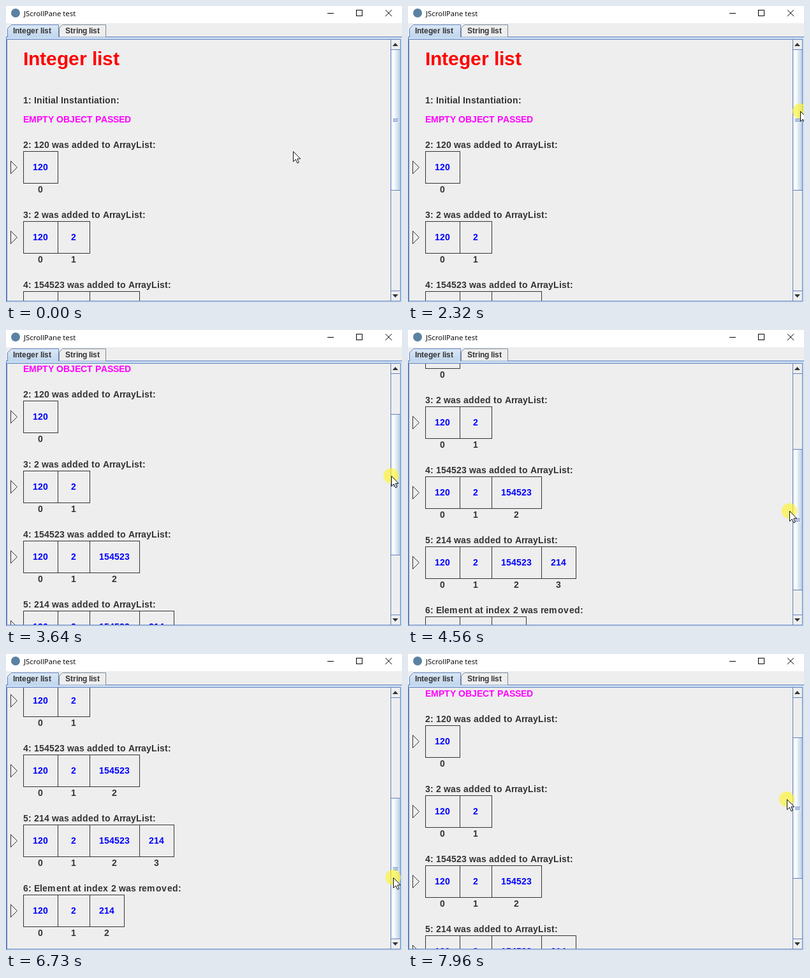
Write an HTML page that moves like this. It is 621 by 465 pixels and loops after 8000 ms.

```html
<!DOCTYPE html>
<html lang="en">
<head>
<meta charset="utf-8">
<title>JScrollPane test</title>
<style>
  html, body { margin: 0; width: 100%; height: 100%; overflow: hidden; background: #eee; }
  svg { display: block; width: 621px; height: 465px; }
  text { font-family: "Liberation Sans", Arial, sans-serif; font-weight: bold; fill: #333; font-kerning: none; }
  .caption { font: 11.4px "Open Sans", "Noto Sans", sans-serif; fill: #000; }
  .line { fill: none; stroke: #333; shape-rendering: crispEdges; }
  .blue { stroke: #6382bf; shape-rendering: crispEdges; }
</style>
</head>
<body>
<svg id="stage" viewBox="0 0 621 465">
  <defs>
    <clipPath id="view"><rect x="2" y="53" width="601" height="410"/></clipPath>
    <linearGradient id="thumbFill">
      <stop offset="0" stop-color="#dde8f3"/>
      <stop offset=".3" stop-color="#fff"/>
      <stop offset=".6" stop-color="#dde8f3"/>
      <stop offset="1" stop-color="#b8cfe5"/>
    </linearGradient>
    <linearGradient id="tabFill" x2="0" y2="1">
      <stop offset="0" stop-color="#dbe8f6"/>
      <stop offset="1" stop-color="#c0d6ec"/>
    </linearGradient>
  </defs>

  <!-- title bar -->
  <rect width="621" height="465" fill="#eee"/>
  <rect width="621" height="27" fill="#fff"/>
  <circle cx="15" cy="11" r="7" fill="#5b82a3"/>
  <text class="caption" x="28" y="16">JScrollPane test</text>
  <g fill="none" stroke="#000">
    <path d="M504 11.5h10M549.5 6.5h9v9h-9z" shape-rendering="crispEdges"/>
    <path d="M595 6.2l10 10M605 6.2l-10 10"/>
  </g>

  <!-- tabs and pane frame -->
  <rect y="48" width="621" height="417" fill="#c8ddf2"/>
  <path class="blue" d="M0 48.5H621M.5 48V465" fill="none"/>
  <path d="M83.5 48.5V34.5L88.5 29.5H156.5V48.5" fill="#eee" stroke="#7a8a99"/>
  <path d="M2.5 49V35.5L8.5 29.5H82.5V49" fill="url(#tabFill)" stroke="#6382bf"/>
  <rect class="blue" x="1.5" y="52.5" width="617" height="411" fill="#eee"/>
  <g id="tabs"></g>

  <g clip-path="url(#view)"><g id="list"></g></g>

  <!-- scroll bar -->
  <path class="blue" d="M603.5 53V463M603 68.5H619M603 447.5H619" fill="none"/>
  <path d="M606 63L610.5 58 615 63zM606 453L610.5 458 615 453z" fill="#333"/>
  <g id="thumb">
    <rect class="blue" x="603.5" y="68.5" width="15" height="221" fill="url(#thumbFill)"/>
    <path d="M608 178.500h8M608 180.500h8M608 182.500h8" stroke="#fff" shape-rendering="crispEdges"/>
    <path class="blue" d="M607 177.500h8M607 179.500h8M607 181.500h8"/>
  </g>

  <g id="pointer">
    <circle id="halo" r="12" fill="#fff52e" opacity=".65"/>
    <path d="M.5 .5V16.500L4.300 13 6.900 18.800 9.300 17.700 6.800 12H11.700z" fill="#fff" stroke="#111"/>
  </g>
</svg>
<script>
const $ = id => document.getElementById(id);
const pen = document.createElement('canvas').getContext('2d');
const wide = { m: 14, v: 9, x: 9 };

function add(parent, tag, attrs) {
  const el = document.createElementNS('http://www.w3.org/2000/svg', tag);
  for (const name in attrs) el.setAttribute(name, attrs[name]);
  return parent.appendChild(el);
}

// Swing style text: every glyph advances by whole pixels.
function label(parent, str, x, y, size = 14, fill = '#333') {
  pen.font = `bold ${size}px "Liberation Sans", Arial, sans-serif`;
  const xs = [];
  for (const ch of str) {
    xs.push(x);
    x += (size === 14 && wide[ch]) || Math.round(pen.measureText(ch).width);
  }
  const el = add(parent, 'text', { x: xs.join(' '), y, 'font-size': size });
  el.style.fill = fill;
  el.textContent = str;
}

function cells(values, top) {
  let x = 27;
  add(list, 'path', { d: `M7.5 ${top + 15.5}l10 10-10 10z`, fill: 'none', stroke: '#333' });
  values.forEach((value, i) => {
    const str = String(value), half = str.length * 4;
    const width = Math.max(50, half * 2 + 30), mid = x + width / 2;
    add(list, 'rect', { class: 'line', x: x + .5, y: top + .5, width, height: 50 });
    label(list, str, mid - half, top + 30, 14, '#00f');
    label(list, String(i), mid - 4, top + 65);
    x += width;
  });
}

label($('tabs'), 'Integer list', 11, 43, 12);
label($('tabs'), 'String list', 93, 43, 12);

const list = $('list');
label(list, 'Integer list', 27, 93, 30, '#f00');
label(list, '1: Initial Instantiation:', 27, 153);
label(list, 'EMPTY OBJECT PASSED', 27, 183, 14, '#f0f');
[
  ['120 was added to ArrayList:', [120]],
  ['2 was added to ArrayList:', [120, 2]],
  ['154523 was added to ArrayList:', [120, 2, 154523]],
  ['214 was added to ArrayList:', [120, 2, 154523, 214]],
  ['Element at index 2 was removed:', [120, 2, 214]]
].forEach(([note, values], i) => {
  const top = 228 + i * 110;
  label(list, `${i + 2}: ${note}`, 27, top - 5);
  cells(values, top);
});

const LOOP = 8000, PRESS = 2320, GRAB = 165, TRAVEL = 158, RANGE = 290;
const home = [450, 228];
// first step, last step, number of steps, end x, end y
const moves = [
  [550, 1240, 10, 601, 167],
  [1390, 1470, 2, 611, 165],
  [1850, 1850, 1, 615, 165],
  [2640, 3410, 11, 607, 219],
  [3490, 3490, 1, 605, 224],
  [3640, 3720, 2, 603, 234],
  [3870, 4180, 5, 600, 264],
  [4330, 4410, 2, 599, 276],
  [4560, 4950, 6, 592, 323],
  [5100, 5480, 6, 596, 384],
  [5650, 5730, 2, 596, 398],
  [6110, 6180, 2, 601, 395],
  [6350, 6730, 6, 607, 351],
  [6890, 7650, 11, 596, 250],
  [7730, 7960, 4, 594, 228]
];
const smooth = p => p * p * (3 - 2 * p);

function pointerAt(t) {
  let [x, y] = home;
  for (const [from, to, steps, endX, endY] of moves) {
    if (t < from) break;
    const gap = (to - from) / (steps - 1) || 1;
    let p = Math.min(1, (Math.floor((t - from) / gap + .01) + 1) / steps);
    if (from === moves[0][0]) p = smooth(p);
    x += (endX - x) * p;
    y += (endY - y) * p;
  }
  return [Math.round(x), Math.round(y)];
}

const start = performance.now();

function draw() {
  const t = Math.max(0, performance.now() - start) % LOOP;
  const [x, y] = pointerAt(t);
  const pressed = t >= PRESS;
  const shift = pressed ? Math.max(0, Math.min(TRAVEL, y - GRAB)) : 0;
  const scroll = Math.round(shift * RANGE / TRAVEL);
  $('halo').style.display = pressed ? '' : 'none';
  $('pointer').setAttribute('transform', `translate(${x} ${y})`);
  $('thumb').setAttribute('transform', `translate(0 ${shift})`);
  list.setAttribute('transform', `translate(0 ${-scroll})`);
  requestAnimationFrame(draw);
}
draw();
</script>
</body>
</html>
```
